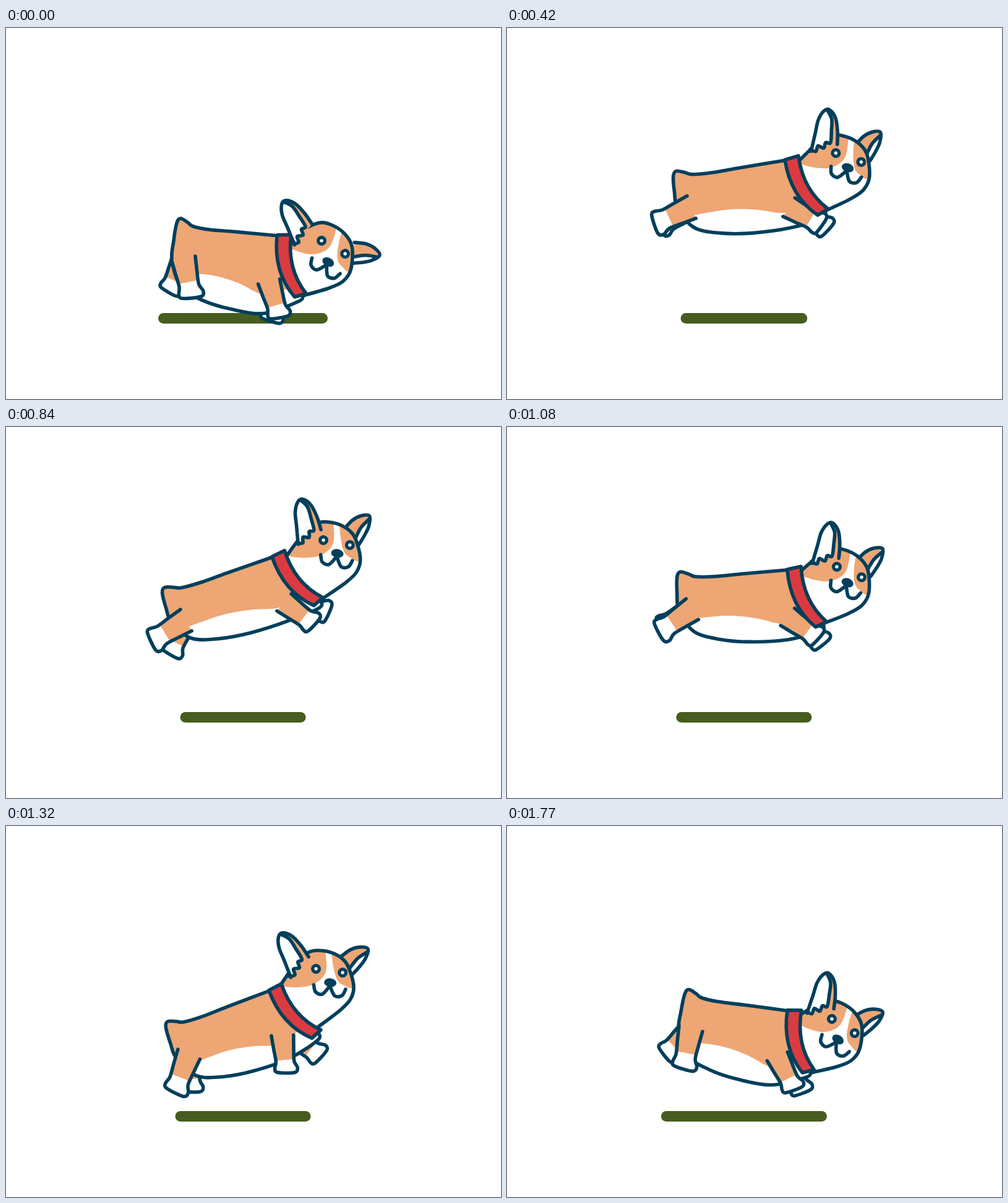
Animation, 800 px wide and 600 px high, one loop 1800 ms. Source, as an HTML page with a canvas:

```html
<!DOCTYPE html>
<html lang="en">
<head>
<meta charset="utf-8">
<title>Running corgi</title>
<style>
  html, body { margin: 0; width: 100%; height: 100%; overflow: hidden; background: #fff; }
  canvas { display: block; }
</style>
</head>
<body>
<canvas id="stage" width="800" height="600"></canvas>
<script>
const ctx = document.getElementById('stage').getContext('2d');
const LINE = '#003f5c', TAN = '#eea674', RED = '#da3b40', GREEN = '#465d1f', WHITE = '#fff';
const CYCLE = 600, STEP = 30, TENSION = 0.62, BACK = 150;

// head: left eye x, y, tilt, ear spread, muzzle drop
// legs: angles of near hind, far hind, near fore, far fore
const poses = [
  { t: 0, rump: [303, 321], nape: [440, 336], head: [510, 344, 29, 36, 8], legs: [-11, 24, -16, 11] },
  { t: 120, rump: [287, 317], nape: [427, 266], head: [501, 231, 8, 14, 2], legs: [21, -4, -5, -53] },
  { t: 240, rump: [283, 260], nape: [432, 210], head: [513, 183, 10.5, 0, 0], legs: [59, 25, -53, -72] },
  { t: 480, rump: [305, 242], nape: [455, 231], head: [533, 226, 23, -9, 0], legs: [56, 61, -54, -45] },
  { t: 570, rump: [315, 278], nape: [455, 299], head: [525, 312, 32, -2, 6], legs: [11, 46, -26, -27] }
];

// Cyclic Hermite spline through one number of the key poses
function spline(pick, time) {
  const n = poses.length;
  const pose = j => poses[(j + n) % n];
  const at = j => pose(j).t + CYCLE * Math.floor(j / n);
  const value = j => pick(pose(j));
  const gap = j => at(j + 1) - at(j);
  const rate = j => (value(j + 1) - value(j)) / gap(j);
  const slope = j =>
    TENSION * (rate(j - 1) * gap(j) + rate(j) * gap(j - 1)) / (gap(j - 1) + gap(j));

  const i = poses.findLastIndex(p => p.t <= time);
  const h = gap(i), u = (time - at(i)) / h, u2 = u * u, u3 = u2 * u;
  return (2 * u3 - 3 * u2 + 1) * value(i) + (u3 - 2 * u2 + u) * h * slope(i)
    + (3 * u2 - 2 * u3) * value(i + 1) + (u3 - u2) * h * slope(i + 1);
}

const points = text => text.split(' ').map(p => p.split(',').map(Number));

// Smooth open path through the points
function curve(pts) {
  const path = new Path2D(), last = pts.length - 1;
  path.moveTo(...pts[0]);
  for (let i = 0; i < last; i++) {
    const a = pts[Math.max(0, i - 1)], b = pts[i], c = pts[i + 1], d = pts[Math.min(last, i + 2)];
    path.bezierCurveTo(b[0] + (c[0] - a[0]) / 6, b[1] + (c[1] - a[1]) / 6,
      c[0] - (d[0] - b[0]) / 6, c[1] - (d[1] - b[1]) / 6, c[0], c[1]);
  }
  return path;
}

function fill(path, color) {
  ctx.fillStyle = color;
  ctx.fill(path);
}

function shape(path, base, markColor, ...marks) {
  fill(path, base);
  ctx.save();
  ctx.clip(path);
  marks.forEach(m => fill(m, markColor));
  ctx.restore();
  ctx.stroke(path);
}

function oval(x, y, rx, ry, color) {
  const path = new Path2D();
  path.ellipse(x, y, rx, ry, 0, 0, 2 * Math.PI);
  fill(path, color);
}

// Draw with the origin moved to x, y and turned
function placed(x, y, degrees, draw) {
  ctx.save();
  ctx.translate(x, y);
  ctx.rotate(degrees * Math.PI / 180);
  draw();
  ctx.restore();
}

const pivoted = (x, y, degrees, draw) =>
  placed(x, y, degrees, () => placed(-x, -y, 0, draw));

const legPoints = points('-20,-2 -18,22 -16,44 -19,56 -15,63 15,66 21,58 16,46 17,25 19,0');
const paw = new Path2D('M-40 39H40V90H-40Z');

function leg(x, y, degrees, size) {
  placed(x, y, degrees, () => {
    const scaled = legPoints.map(([px, py]) => [px * size, py * size]);
    shape(curve(scaled), TAN, WHITE, paw);
  });
}

const backPoints = points('150,0 75,1 30,2 0,0 -11,-5 -24,-9.5 -30,-2 -32,25 -31,52 -10,88 30,104 80,112 140,113');
const bellyPoints = points('-20,68 45,67 90,74 130,86 150,82 220,70 200,140 -20,140');
const collar = new Path2D('M-2 -1L20.5 -4Q19.5 52 55 88L37 95.5Q-2 59 -2 -1Z');

// The back stretches and the belly thins to keep its volume
function body(length) {
  const long = length / BACK, thick = long ** -1.4;
  const squash = pts => pts.map(([x, y]) => [x * long, y * thick]);
  const chest = [[length + 44, 102], [length + 50, 92]];
  shape(curve([...squash(backPoints), ...chest]), TAN, WHITE, curve(squash(bellyPoints)));
}

const skull = curve(points('-53,34 -38,4 -19,-22 0,-30 27,-28 48,-15 64,18 62,41 47,62 17,92'));
const nearPatch = curve(points('-57,36 -27,34 0,25 16,4 12,-26 0,-60 -80,-30'));
const farPatch = curve(points('20,-34 27,-8 36,12 48,20 68,20 90,-20 50,-60'));
const nearEar = points('-39,14 -47,-15 -53,-36 -52,-53 -45,-59 -30,-52 -17,-35 -7,-16');
const farEar = points('30,-24 40,-40 53,-50 66,-52 68,-36 64,-20 58,-4');
const farFold = points('50,-11 56,-31 66,-46');
const nearFold = points('-48,-57 -35,-48 -26,-31 -18,-13');
const TUFTS = 5;
for (let i = 1; i <= TUFTS; i++) {
  const u = i / TUFTS, side = i % 2 ? -3.5 : 3.5;
  nearFold.push([-18 - 21 * u + side * 0.8, -13 + 27 * u + side * 0.6]);
}
const smile = curve(points('0,24 4.5,35 16,37 26,22'));

function ear(outline, fold, edge) {
  const path = curve(outline);
  fill(path, TAN);
  fill(curve([...fold, ...edge]), WHITE);
  ctx.stroke(curve(fold));
  ctx.stroke(path);
}

function face(drop) {
  for (const x of [0, 43.5]) {
    oval(x, 0, 8, 8, LINE);
    oval(x, 0, 2.7, 2.7, WHITE);
  }
  ctx.translate(26, drop);
  for (const side of [1, -1]) {
    ctx.save();
    ctx.scale(side, 1);
    ctx.translate(-26, 0);
    ctx.stroke(smile);
    ctx.restore();
  }
  oval(0, 17, 10, 7, LINE);
}

function shadow(time) {
  const half = 101.5 + 35.5 * Math.abs(Math.cos(Math.PI * time / CYCLE)) ** 7;
  ctx.fillStyle = GREEN;
  ctx.beginPath();
  ctx.roundRect(383 - half, 461, 2 * half, 17, 8.5);
  ctx.fill();
}

function dog(time) {
  const get = name => poses[0][name].map((_, i) => spline(p => p[name][i], time));
  const rump = get('rump'), nape = get('nape');
  const [eyeX, eyeY, tilt, spread, drop] = get('head');
  const [nearHind, farHind, nearFore, farFore] = get('legs');
  const dx = nape[0] - rump[0], dy = nape[1] - rump[1];
  const length = Math.hypot(dx, dy), lean = Math.atan2(dy, dx) * 180 / Math.PI;

  placed(...rump, lean, () => {
    leg(-10, 53, farHind - lean, 0.92);
    leg(length + 8, 79, farFore - lean, 0.92);
    body(length);
    leg(-10, 53, nearHind - lean, 1);
    leg(length - 6, 76, nearFore - lean, 0.92);
  });
  placed(eyeX, eyeY, tilt, () => {
    pivoted(38, 4, spread, () => ear(farEar, farFold, farEar.slice(4)));
    shape(skull, WHITE, TAN, nearPatch, farPatch);
  });
  placed(...nape, lean, () => shape(collar, RED));
  placed(eyeX, eyeY, tilt, () => {
    pivoted(-17, 14, -spread, () => ear(nearEar, nearFold, nearEar.slice(0, 4)));
    face(drop);
  });
}

function draw(time) {
  ctx.fillStyle = WHITE;
  ctx.fillRect(0, 0, 800, 600);
  shadow(time);

  ctx.strokeStyle = LINE;
  ctx.lineWidth = 5.6;
  ctx.lineCap = ctx.lineJoin = 'round';
  // The weight rolls forward and sinks just after landing
  const sink = time < 120 ? Math.sin(Math.PI * time / 120) ** 2 : 0;
  placed(12 * sink, 10 * sink, 0, () => dog(time));
}

function tick() {
  draw(Math.floor(performance.now() / STEP) * STEP % CYCLE);
  requestAnimationFrame(tick);
}
tick();
</script>
</body>
</html>
```
